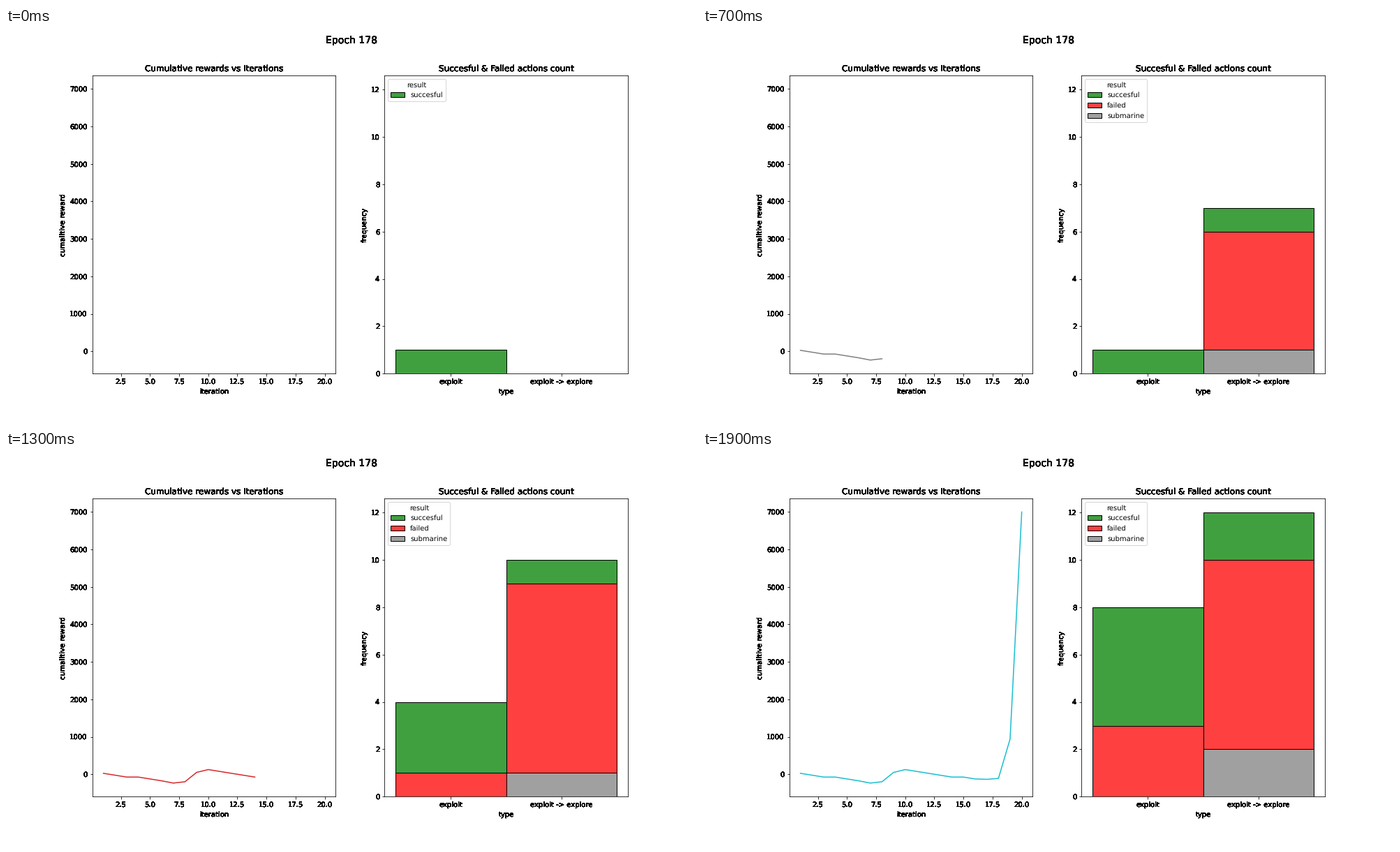
These frames come from a looping animation (990 px wide and 566 px high, 2 s). A matplotlib script:

```python
import matplotlib.pyplot as plt
import numpy as np
from matplotlib.animation import FuncAnimation
from matplotlib.patches import Patch

DPI = 72
WIDTH, HEIGHT = 990, 566
STEPS = 20

REWARDS = [25, -25, -75, -75, -125, -175, -235, -200, 50, 125,
           75, 25, -25, -75, -75, -125, -135, -110, 940, 7000]

# One action per iteration: column (0 exploit, 1 explore) and result
COLUMNS = [int(c) for c in "01111111001101100100"]
RESULTS = "sffufffsssffffuffsss"
KINDS = {"s": ("succesful", "green"),
         "f": ("failed", "red"),
         "u": ("submarine", "gray")}
STACK = "ufs"  # bottom to top


def heavy(text, passes=STEPS):
    """Draw a text several times over itself, which hardens its edges."""
    once = text.draw

    def draw(renderer):
        for _ in range(passes):
            once(renderer)

    text.draw = draw


def label_axes(ax, title, xlabel, ylabel):
    ax.set_title(title, fontsize=12)
    ax.set_xlabel(xlabel)
    ax.set_ylabel(ylabel)
    texts = [ax.title, ax.xaxis.label, ax.yaxis.label]
    for text in texts + ax.get_xticklabels() + ax.get_yticklabels():
        heavy(text)


plt.rcParams.update({"font.family": "DejaVu Sans", "font.size": 10,
                     "text.hinting": "no_hinting"})
fig, (left, right) = plt.subplots(
    1, 2, dpi=DPI, figsize=(WIDTH / DPI, HEIGHT / DPI))
fig.subplots_adjust(left=0.125, right=0.9, bottom=0.125, top=0.88, wspace=0.2)
heavy(fig.suptitle("Epoch 178", fontsize=14))

pad = 0.05 * (max(REWARDS) - min(REWARDS))
left.set_xlim(0.05, 20.95)
left.set_ylim(min(REWARDS) - pad, max(REWARDS) + pad)
x_ticks = np.arange(2.5, 20.1, 2.5)
left.set_xticks(x_ticks, [f"{x:.1f}" for x in x_ticks])
left.set_yticks(range(0, 7001, 1000))
label_axes(left, "Cumulative rewards vs Iterations",
           "iteration", "cumalitive reward")

right.set_xlim(-0.6, 1.6)
right.set_ylim(0, 12.6)
right.set_xticks([0, 1], ["exploit", "exploit -> explore"])
right.set_yticks(range(0, 13, 2))
label_axes(right, "Succesful & Failed actions count", "type", "frequency")

line, = left.plot([], [], lw=1.5)


def style(kind):
    return dict(facecolor=(KINDS[kind][1], 0.75), edgecolor="black",
                linewidth=1)


bars = {kind: right.bar([0, 1], [0, 0], width=1, **style(kind))
        for kind in STACK}


def update(step):
    done = step + 1
    line.set_data(range(1, done + 1), REWARDS[:done])
    line.set_color(f"C{step % 10}")

    actions = list(zip(COLUMNS[:done], RESULTS))
    for column in (0, 1):
        base = 0
        for kind in STACK:
            count = actions.count((column, kind))
            bar = bars[kind][column]
            bar.set_y(base)
            bar.set_height(count)
            bar.set_visible(count > 0)
            base += count

    seen = [kind for kind in KINDS if kind in RESULTS[:done]]
    right.legend([Patch(**style(kind)) for kind in seen],
                 [KINDS[kind][0] for kind in seen],
                 title="result", loc="upper left")
    return []


def reset():
    return update(0)


anim = FuncAnimation(fig, update, frames=STEPS, init_func=reset,
                     interval=100, repeat=True, repeat_delay=0, blit=False)
plt.show()
```
